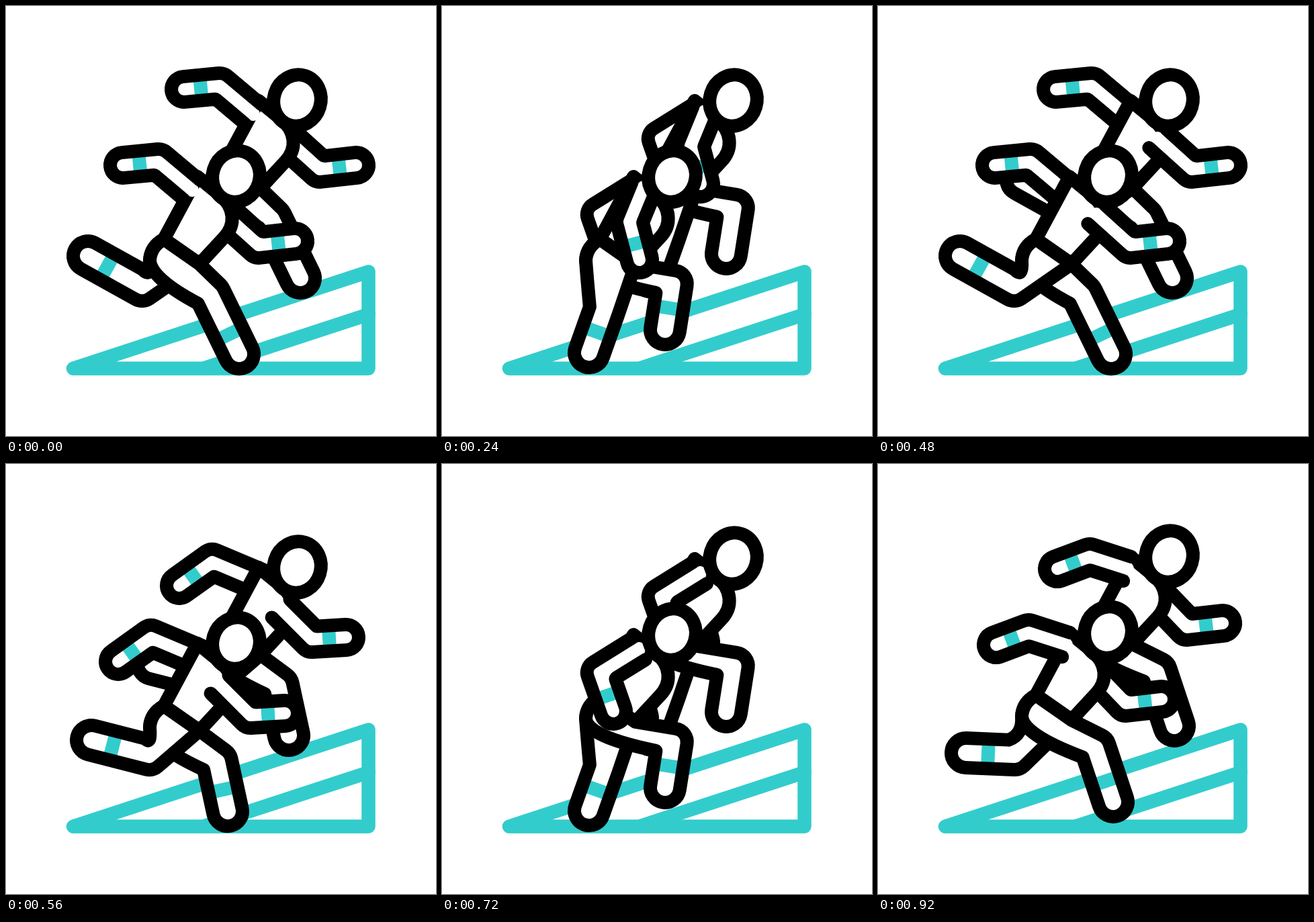
An HTML page with a canvas that plays this animation: 640 px wide and 640 px high, repeating every 960 ms.

```html
<!DOCTYPE html>
<html>
<head>
<meta charset="utf-8">
<style>
  html, body { margin: 0; overflow: hidden; background: #fff; }
  canvas { display: block; }
</style>
</head>
<body>
<canvas id="stage" width="640" height="640"></canvas>
<script>
const ctx = document.getElementById('stage').getContext('2d');
const LOOP = 960, STEP = 40, TEAL = '#33cccc';

// Rows: time, shoulder x y, elbow x y, hand x y
const ARM = [
  [0, 277, 274, 227, 232, 174, 237],
  [80, 285, 288, 216, 259, 167, 294],
  [160, 291, 281, 225, 300, 214, 360],
  [240, 300, 270, 279, 321, 294, 378],
  [320, 308, 288, 307, 348, 367, 367],
  [400, 316, 311, 352, 349, 405, 349],
  [440, 322, 307, 369, 356, 422, 350],
  [480, 325, 310, 376, 356, 430, 350],
  [560, 318, 328, 364, 374, 415, 371],
  [640, 288, 309, 306, 380, 359, 393],
  [720, 293, 275, 235, 311, 255, 368],
  [800, 295, 271, 228, 286, 240, 347],
  [880, 291, 268, 226, 287, 215, 344],
  [920, 280, 269, 224, 251, 176, 269]
];

// Rows: time, knee x y, foot x y
const LEG = [
  [0, 304, 430, 347, 518],
  [80, 314, 443, 330, 517],
  [160, 285, 460, 274, 520],
  [240, 241, 454, 219, 516],
  [320, 211, 461, 159, 519],
  [400, 206, 441, 136, 487],
  [440, 203, 433, 131, 430],
  [480, 203, 417, 122, 372],
  [560, 213, 433, 127, 411],
  [640, 288, 439, 197, 463],
  [720, 343, 412, 332, 482],
  [800, 342, 401, 353, 470],
  [880, 337, 411, 354, 489],
  [920, 323, 422, 350, 503]
];

const BOB = [[0, 0], [80, 13], [160, 6], [240, 0], [320, -13], [400, -7], [440, -3]];

// Smooth periodic interpolation of keyed rows
function sample(keys, time, period) {
  const t = time % period, n = keys.length;
  const row = i => {
    const turn = Math.floor(i / n), r = keys[i - turn * n];
    return [r[0] + turn * period, ...r.slice(1)];
  };
  let i = n - 1;
  while (keys[i][0] > t) i--;
  const [a, b, c, d] = [-1, 0, 1, 2].map(k => row(i + k));
  const span = c[0] - b[0], u = (t - b[0]) / span;
  return b.slice(1).map((p, k) => {
    k++;
    const m0 = (c[k] - a[k]) / (c[0] - a[0]) * span;
    const m1 = (d[k] - b[k]) / (d[0] - b[0]) * span;
    const diff = c[k] - p;
    return p + u * (m0 + u * (3 * diff - 2 * m0 - m1 + u * (m0 + m1 - 2 * diff)));
  });
}

function line(points, color, width, cap = 'round') {
  ctx.beginPath();
  points.forEach(p => ctx.lineTo(...p));
  ctx.lineCap = cap;
  ctx.strokeStyle = color;
  ctx.lineWidth = width;
  ctx.stroke();
}

function outline() {
  ctx.lineCap = 'round';
  ctx.strokeStyle = '#000';
  ctx.lineWidth = 20;
  ctx.stroke();
}

const shift = (p, v, k) => [p[0] + v[0] * k, p[1] + v[1] * k];

function direction(a, b) {
  const dx = b[0] - a[0], dy = b[1] - a[1], len = Math.hypot(dx, dy);
  return [dx / len, dy / len];
}

// Side normals and mitre vector of a two-segment limb
function geometry(root, joint, tip) {
  const d1 = direction(root, joint), d2 = direction(joint, tip);
  const n1 = [-d1[1], d1[0]], n2 = [-d2[1], d2[0]];
  const k = 1 / Math.max(0.3, 1 + n1[0] * n2[0] + n1[1] * n2[1]);
  return { d2, n1, n2, miter: [(n1[0] + n2[0]) * k, (n1[1] + n2[1]) * k] };
}

function roundTip(tip, d, w) {
  const angle = Math.atan2(d[1], d[0]);
  ctx.arc(...tip, w, angle + Math.PI / 2, angle - Math.PI / 2, true);
}

function band(tip, d, n, back, half) {
  const mid = shift(tip, d, -back);
  line([shift(mid, n, half), shift(mid, n, -half)], TEAL, 20, 'butt');
}

function drawArm(time) {
  const [sx, sy, ex, ey, hx, hy] = sample(ARM, time, LOOP);
  const root = [sx, sy], elbow = [ex, ey], hand = [hx, hy], w = 19;
  const { d2, n1, n2, miter } = geometry(root, elbow, hand);
  const trace = () => {
    ctx.beginPath();
    ctx.moveTo(...shift(root, n1, w));
    ctx.arcTo(...shift(elbow, miter, w), ...shift(hand, n2, w), 18);
    roundTip(hand, d2, w);
    ctx.arcTo(...shift(elbow, miter, -w), ...shift(root, n1, -w), 2);
    ctx.lineTo(...shift(root, n1, -w));
  };
  trace();
  ctx.fill();
  line([root, elbow], '#fff', 20);
  band(hand, d2, n2, 25, w);
  trace();
  outline();
}

function drawLeg(time, bob, sock) {
  const [kx, ky, fx, fy] = sample(LEG, time, LOOP);
  const knee = [kx, ky], foot = [fx, fy], w = 22;
  const { d2, n1, n2, miter } = geometry([258, 383 + bob], knee, foot);
  const trace = () => {
    ctx.beginPath();
    ctx.moveTo(235, 347 + bob);
    ctx.quadraticCurveTo(215, 358 + bob, 214, 379 + bob);
    ctx.quadraticCurveTo(216, 406 + bob, ...shift(knee, miter, w));
    ctx.lineTo(...shift(foot, n2, w));
    roundTip(foot, d2, w);
    ctx.arcTo(...shift(knee, miter, -w), 288, 384 + bob, 20);
    ctx.lineTo(288, 384 + bob);
    ctx.closePath();
  };
  trace();
  ctx.fill();
  if (sock) band(foot, d2, n2, 33, w);
  trace();
  outline();
}

function drawTorso(bob) {
  ctx.save();
  ctx.translate(0, bob);
  ctx.beginPath();
  ctx.moveTo(285, 254);
  ctx.lineTo(318, 281);
  ctx.bezierCurveTo(341, 300, 342, 326, 325, 344);
  ctx.lineTo(288, 384);
  ctx.lineTo(235, 347);
  ctx.closePath();
  ctx.fill();
  outline();
  ctx.restore();
}

function drawHead(bob) {
  ctx.beginPath();
  ctx.ellipse(342.5, 253.5 + bob, 35, 38.5, 0.3, 0, 2 * Math.PI);
  ctx.fill();
  outline();
}

function drawRunner(time, x, y, leading) {
  const far = time + LOOP / 2, [bob] = sample(BOB, time, LOOP / 2);
  ctx.save();
  ctx.translate(x, y);
  ctx.fillStyle = '#fff';
  drawArm(far);
  ctx.save();
  if (leading) {
    // The leader's trailing far leg stays out of sight
    ctx.beginPath();
    ctx.rect(209, 0, 640, 640);
    ctx.clip();
  }
  drawLeg(far, bob, !leading);
  ctx.restore();
  drawTorso(bob);
  drawLeg(time, bob, !leading);
  drawArm(time);
  drawHead(bob);
  ctx.restore();
}

function drawRamp() {
  line([[100, 539.5], [539.5, 395.5], [539.5, 539.5], [100, 539.5]], TEAL, 20.5);
  line([[295, 539], [539.5, 459]], TEAL, 20.5);
}

function frame(now) {
  const time = Math.floor(now / STEP) * STEP % LOOP;
  ctx.fillStyle = '#fff';
  ctx.fillRect(0, 0, 640, 640);
  ctx.lineJoin = 'round';
  drawRamp();
  drawRunner(time, 91, -113, true);
  drawRunner(time, 0, 0, false);
  requestAnimationFrame(frame);
}

requestAnimationFrame(frame);
</script>
</body>
</html>
```
